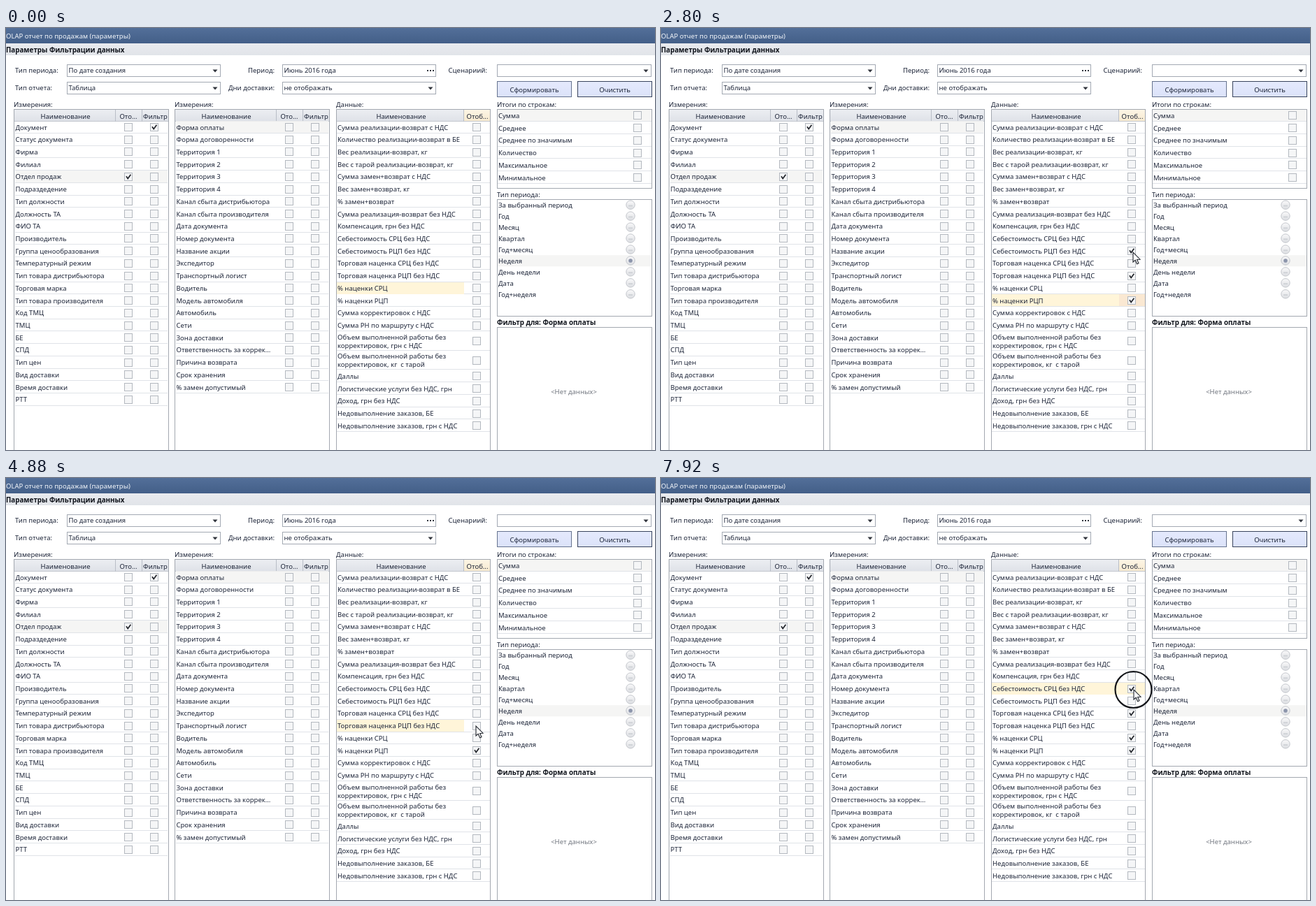
Write an HTML page with a canvas that moves like this. It is 928 px wide and 604 px high and loops after 8 s.

```html
<!DOCTYPE html>
<html lang="ru">
<head>
<meta charset="utf-8">
<style>
  html, body { margin: 0; width: 100%; height: 100%; overflow: hidden; background: #fff; }
  canvas { display: block; }
</style>
</head>
<body>
<canvas id="stage" width="928" height="604"></canvas>
<script>
const stage = document.getElementById('stage');
const base = document.createElement('canvas');
base.width = 928;
base.height = 604;
let ctx = base.getContext('2d');

const LOOP = 8000, PITCH = 17.72, TOP = 133.2;
const INK = '#1c2438', EDGE = '#a3a8b0', LINE = '#e0e3e8', SOFT = '#f5f5f4';
const FACE = '"Noto Sans", "Open Sans", sans-serif';

const dims = ['Документ', 'Статус документа', 'Фирма', 'Филиал', 'Отдел продаж', 'Подраздедение',
  'Тип должности', 'Должность ТА', 'ФИО ТА', 'Производитель', 'Группа ценообразования',
  'Температурный режим', 'Тип товара дистрибьютора', 'Торговая марка', 'Тип товара производителя',
  'Код ТМЦ', 'ТМЦ', 'БЕ', 'СПД', 'Тип цен', 'Вид доставки', 'Время доставки', 'РТТ'];
const dims2 = ['Форма оплаты', 'Форма договоренности', 'Территория 1', 'Территория 2', 'Территория 3',
  'Территория 4', 'Канал сбыта дистрибьютора', 'Канал сбыта производителя', 'Дата документа',
  'Номер документа', 'Название акции', 'Экспедитор', 'Транспортный логист', 'Водитель',
  'Модель автомобиля', 'Автомобиль', 'Сети', 'Зона доставки', 'Ответственность за коррек...',
  'Причина возврата', 'Срок хранения', '% замен допустимый'];
const facts = ['Сумма реализации-возврат с НДС', 'Количество реализации-возврат в БЕ',
  'Вес реализации-возврат, кг', 'Вес с тарой реализации-возврат, кг', 'Сумма замен+возврат с НДС',
  'Вес замен+возврат, кг', '% замен+возврат', 'Сумма реализация-возврат без НДС',
  'Компенсация, грн без НДС', 'Себестоимость СРЦ без НДС', 'Себестоимость РЦП без НДС',
  'Торговая наценка СРЦ без НДС', 'Торговая наценка РЦП без НДС', '% наценки СРЦ', '% наценки РЦП',
  'Сумма корректировок с НДС', 'Сумма РН по маршруту с НДС',
  'Объем выполненной работы без|корректировок, грн с НДС',
  'Объем выполненной работы без|корректировок, кг  с тарой',
  'Даллы', 'Логистические услуги без НДС, грн', 'Доход, грн без НДС',
  'Недовыполнение заказов, БЕ', 'Недовыполнение заказов, грн с НДС'];
const totals = ['Сумма', 'Среднее', 'Среднее по значимым', 'Количество', 'Максимальное', 'Минимальное'];
const spans = ['За выбранный период', 'Год', 'Месяц', 'Квартал', 'Год+месяц', 'Неделя',
  'День недели', 'Дата', 'Год+неделя'];

function rect(x, y, w, h, color) {
  ctx.fillStyle = color;
  ctx.fillRect(x, y, w, h);
}

function frame(x, y, w, h, color = EDGE, fill) {
  if (fill) rect(x, y, w, h, fill);
  ctx.strokeStyle = color;
  ctx.lineWidth = 1;
  ctx.strokeRect(x + .5, y + .5, w - 1, h - 1);
}

function text(s, x, y, { color = INK, align = 'left', bold = false } = {}) {
  ctx.font = (bold ? 'bold 9.8px ' : '9.5px ') + FACE;
  ctx.textAlign = align;
  ctx.fillStyle = color;
  ctx.fillText(s, x, Math.round(y + 3.5));
}

function fade(y, h, a, b) {
  const g = ctx.createLinearGradient(0, y, 0, y + h);
  g.addColorStop(0, a);
  g.addColorStop(1, b);
  return g;
}

function tick(x, y) {
  ctx.strokeStyle = '#22252b';
  ctx.lineWidth = 1.7;
  ctx.beginPath();
  ctx.moveTo(x - 3, y - .7);
  ctx.lineTo(x - .8, y + 2.6);
  ctx.lineTo(x + 3.4, y - 3.2);
  ctx.stroke();
}

function box(x, y, on, warm) {
  x = Math.round(x);
  y = Math.round(y);
  frame(x - 6, y - 6, 12, 12, warm ? '#c9a877' : '#b3b8bf', warm ? '#f3d6a8' : '#f5f6f7');
  if (on) tick(x, y);
}

function arrow(x, y) {
  ctx.fillStyle = '#30343c';
  ctx.beginPath();
  ctx.moveTo(x - 3.5, y - 1.5);
  ctx.lineTo(x + 3.5, y - 1.5);
  ctx.lineTo(x, y + 2.5);
  ctx.fill();
}

function field(x, y, w, value, dots) {
  frame(x, y, w, 18, '#a3a9b3', '#fff');
  text(value, x + 2.5, y + 8.5);
  if (dots) for (let i = 0; i < 3; i++) rect(x + w - 13 + i * 4, y + 8, 2, 2, '#30343c');
  else arrow(x + w - 8, y + 9);
}

function button(x, label, edge) {
  frame(x, 76, 107, 23, edge, fade(76, 23, '#e5eafd', '#dbe2f9'));
  text(label, x + 53.5, 88, { align: 'center' });
}

function header(x, cols) {
  rect(x, 117, 220, 16, fade(117, 16, '#eceef2', '#dfe2e8'));
  rect(x, 133, 220, 1, '#c3c7ce');
  cols.forEach(([label, left, w]) => {
    text(label, x + left + w / 2, 126, { align: 'center' });
    if (left) rect(x + left, 117, 1, 17, '#b9bec7');
  });
}

const rowY = i => TOP + PITCH * i;

function grid(x, names, marks, current) {
  header(x, [['Наименование', 0, 146], ['Ото...', 144, 38], ['Фильтр', 182, 39]]);
  names.forEach((name, i) => {
    const y = rowY(i), mid = y + 8.8;
    if (i === current) rect(x + 1, y, 218, PITCH, SOFT);
    rect(x + 1, Math.round(y + PITCH) - 1, 218, 1, LINE);
    text(name, x + 1.5, mid);
    box(x + 163, mid, marks.includes(i + 'a'));
    box(x + 200, mid, marks.includes(i + 'b'));
  });
  frame(x - 1, 116, 222, 500);
}

function factRow(i) {
  const tall = Math.min(Math.max(i - 17, 0), 2);
  return [rowY(i) + tall * 9.8, i === 17 || i === 18 ? 27.5 : PITCH];
}

function drawFact(i, checked, glow, full, warm) {
  const [y, h] = factRow(i), mid = y + h / 2;
  if (glow) {
    rect(473, Math.round(y), 182, Math.round(h) - 1, '#fff5d9');
    if (full) rect(655, Math.round(y), 37, Math.round(h) - 1, full);
  }
  const lines = facts[i].split('|');
  lines.forEach((s, k) => text(s, 474, mid + (k - (lines.length - 1) / 2) * 11.8));
  box(672.5, mid, checked, warm);
}

function drawBase() {
  rect(0, 0, 928, 604, '#fff');
  rect(0, 0, 928, 22, fade(0, 22, '#536f99', '#435f88'));
  text('OLAP отчет по продажам (параметры)', 0, 11, { color: '#f5f8fc' });
  rect(0, 22, 928, 17, fade(22, 17, '#e9ebef', '#e1e4e9'));
  text('Параметры Фильтрации данных', 0, 31, { color: '#10141c', bold: true });

  text('Тип периода:', 13, 60.5);
  text('Тип отчета:', 13, 85.5);
  text('Период:', 384, 60.5, { align: 'right' });
  text('Дни доставки:', 384, 85.5, { align: 'right' });
  text('Сценариий:', 688, 60, { align: 'right' });
  field(87, 52, 220, 'По дате создания');
  field(87, 77, 220, 'Таблица');
  field(395, 52, 220, 'Июнь 2016 года', true);
  field(395, 77, 220, 'не отображать');
  field(702, 52, 221, '');
  button(702, 'Сформировать', '#66738f');
  button(817, 'Очистить', '#39445c');

  text('Измерения:', 11, 109);
  text('Измерения:', 241, 109);
  text('Данные:', 472, 109);
  text('Итоги по строкам:', 702, 109);

  grid(12, dims, ['0b', '4a'], 4);
  grid(242, dims2, [], 0);

  header(472, [['Наименование', 0, 186], ['', 182, 38]]);
  rect(655, 117, 37, 16, fade(117, 16, '#fcf5e5', '#f7ead0'));
  text('Отоб...', 674, 126, { align: 'center' });
  facts.forEach((_, i) => {
    const [y, h] = factRow(i);
    rect(473, Math.round(y + h) - 1, 219, 1, LINE);
  });
  frame(472, 116, 221, 500);

  totals.forEach((name, i) => {
    const y = 116.6 + PITCH * i;
    if (!i) rect(703, 117, 220, 17, SOFT);
    rect(703, Math.round(y + PITCH) - 1, 220, 1, LINE);
    text(name, 704, y + 8.8);
    box(903, y + 8.8);
  });
  frame(702, 116, 222, 114);

  text('Тип периода:', 702, 238);
  spans.forEach((name, i) => {
    const y = 253.5 + 15.95 * i, on = i === 5;
    if (on) rect(703, y - 8, 220, 16, SOFT);
    text(name, 704, y);
    ctx.beginPath();
    ctx.arc(893, y - .3, 6.2, 0, 7);
    ctx.fillStyle = fade(y - 6, 12, '#f8f8f9', '#dcdee2');
    ctx.fill();
    ctx.strokeStyle = '#c3c6cc';
    ctx.lineWidth = 1;
    ctx.stroke();
    if (on) {
      ctx.beginPath();
      ctx.arc(893, y - .3, 2.8, 0, 7);
      ctx.fillStyle = '#8c95ab';
      ctx.fill();
    } else rect(890, y, 6, 2, '#d0d3d8');
  });
  frame(702, 245, 222, 168);

  text('Фильтр для: Форма оплаты', 702, 421, { color: '#10141c', bold: true });
  frame(702, 428, 222, 200);
  text('<Нет данных>', 812, 520, { color: '#70757e', align: 'center' });
}

// [time, x, y] of the pointer tip
const path = [[640, 735, 425], [1040, 672, 392], [1560, 672, 392], [1840, 672, 356], [2200, 672, 356],
  [2480, 675, 321], [3440, 675, 321], [3840, 672, 355], [5120, 672, 355], [5520, 671, 374],
  [6480, 671, 374], [6800, 674, 338], [7280, 674, 338], [7600, 676, 303], [8000, 676, 303]];
// [row, checked from, checked until]
const checks = [[14, 1440, LOOP], [12, 2080, 4480], [10, 2640, 3200], [13, 6320, LOOP],
  [11, 7040, LOOP], [9, 7840, LOOP]];
// [from, row, colour of the check cell]
const glows = [[0, 13], [1360, 14, '#fae8d2'], [3200, 10], [4480, 12], [5600, 13, '#fff5d9'],
  [6880, 11, '#fff5d9'], [7680, 9, '#fff5d9']];
const clicks = [1280, 2000, 2540, 3120, 4360, 6120, 6960, 7800];

function pointerAt(t) {
  const i = path.findIndex(p => p[0] > t);
  if (i < 1) return null;
  const [t0, x0, y0] = path[i - 1], [t1, x1, y1] = path[i];
  const u = (t - t0) / (t1 - t0), e = u * u * (3 - 2 * u);
  return [x0 + (x1 - x0) * e, y0 + (y1 - y0) * e];
}

function drawPointer(x, y) {
  const shape = [[0, 0], [0, 14], [3.2, 11.2], [5.6, 16.8], [8, 15.8], [5.6, 10.4], [10, 10.2]];
  ctx.beginPath();
  shape.forEach(([a, b]) => ctx.lineTo(x + a, y + b));
  ctx.closePath();
  ctx.fillStyle = '#fff';
  ctx.fill();
  ctx.strokeStyle = '#22262e';
  ctx.lineWidth = 1.1;
  ctx.stroke();
}

function draw(t) {
  ctx.drawImage(base, 0, 0);
  const [, row, full] = glows.filter(g => g[0] <= t).pop();
  const warm = t >= 5600 && t < 6320;
  facts.forEach((_, i) => {
    const on = checks.some(([r, a, b]) => r === i && t >= a && t < b);
    drawFact(i, on, i === row, full, warm && i === row);
  });
  const p = pointerAt(t);
  if (!p) return;
  if (clicks.some(c => t >= c - 60 && t < c + 200)) {
    ctx.beginPath();
    ctx.arc(p[0] - .5, p[1], 26, 0, 7);
    ctx.strokeStyle = '#14161a';
    ctx.lineWidth = 2.2;
    ctx.stroke();
  }
  drawPointer(...p);
}

drawBase();
ctx = stage.getContext('2d');
const start = performance.now();
function loop() {
  draw((performance.now() - start) % LOOP);
  requestAnimationFrame(loop);
}
loop();
</script>
</body>
</html>
```
